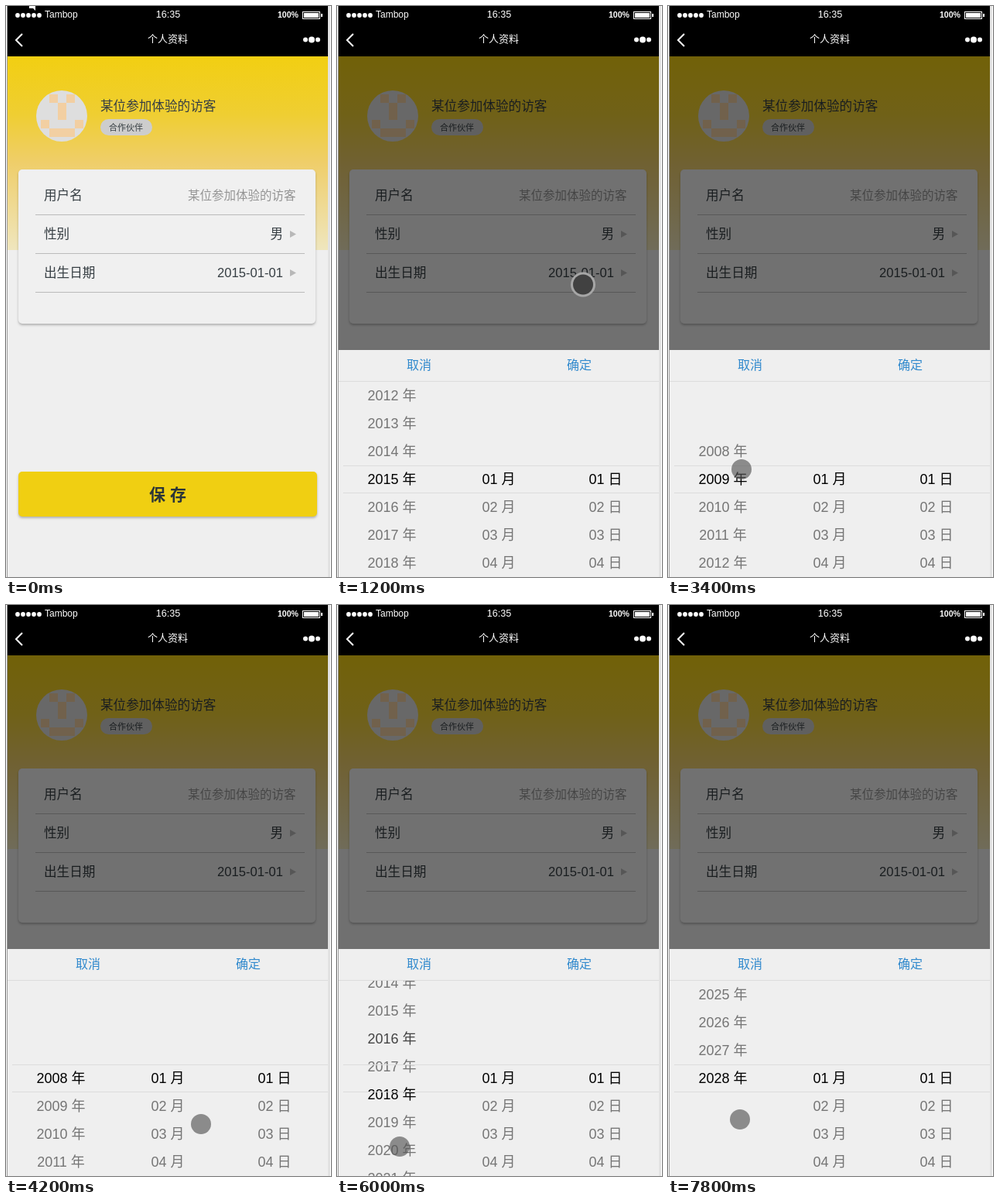
Write an HTML page with a canvas that moves like this. It is 420 px wide and 737 px high and loops after 8 s.

```html
<!DOCTYPE html>
<html lang="zh">
<head>
<meta charset="utf-8">
<style>
html, body { margin: 0; width: 100%; height: 100%; overflow: hidden; background: #fff; }
canvas { display: block; }
</style>
</head>
<body>
<canvas id="stage" width="420" height="737"></canvas>
<script>
const ctx = document.getElementById('stage').getContext('2d');
const LOOP = 8000, STEP = 200, ROW = 36, CENTER = 611;
const OPEN_AT = 1200, FIRST_YEAR = 2008, LAST_YEAR = 2028;
const USER = '某位参加体验的访客';
const FONT = '"Liberation Sans", "Noto Sans CJK SC", "Noto Sans CJK", sans-serif';
const INK = '#363e43', DIM_INK = '#757575', LINE = '#dcdcdc';

// Each flick turns the year wheel by a number of rows.
const flicks = [
  { start: 2000, end: 3000, rows: -6 },
  { start: 3400, end: 4000, rows: -1 },
  { start: 5000, end: 6130, rows: 10 },
  { start: 6160, end: 7760, rows: 10 },
];

// Resting places of the finger: [time, x, y]
const finger = [[200, 150, 300], [400, 342, 617], [800, 318, 359.5], [1200, 318, 359.5],
  [2000, 85, 540], [3400, 95, 598], [4200, 252, 670], [4800, 81, 703],
  [6000, 81, 699], [7000, 87, 688], [7800, 93, 664]];

const clamp = x => Math.min(1, Math.max(0, x));
const ease = x => 0.27 * x + 0.73 * x * x * (3 - 2 * x);

function yearAt(t) {
  return flicks.reduce((year, f) =>
    year + f.rows * ease(clamp((t - f.start) / (f.end - f.start))), 2015);
}

function fingerAt(t) {
  const i = finger.findIndex(p => p[0] >= t);
  const [t1, x1, y1] = finger[i], [t0, x0, y0] = finger[Math.max(0, i - 1)];
  const f = t1 > t0 ? (t - t0) / (t1 - t0) : 1;
  return [x0 + (x1 - x0) * f, y0 + (y1 - y0) * f];
}

function rect(x, y, w, h, color) {
  ctx.fillStyle = color;
  ctx.fillRect(x, y, w, h);
}

function disc(x, y, r, color) {
  ctx.fillStyle = color;
  ctx.beginPath();
  ctx.arc(x, y, r, 0, Math.PI * 2);
  ctx.fill();
}

function panel(x, y, w, h, r, color, shadow) {
  ctx.save();
  if (shadow) {
    ctx.shadowColor = 'rgba(0,0,0,.25)';
    ctx.shadowBlur = 3;
    ctx.shadowOffsetY = 2;
  }
  ctx.fillStyle = color;
  ctx.beginPath();
  ctx.roundRect(x, y, w, h, r);
  ctx.fill();
  ctx.restore();
}

function poly(points, color) {
  ctx.fillStyle = color;
  ctx.beginPath();
  points.forEach(p => ctx.lineTo(...p));
  ctx.fill();
}

// y is the middle of the line
function text(str, x, y, size, color, align = 'left', weight = 400) {
  ctx.font = `${weight} ${size}px ${FONT}`;
  ctx.textAlign = align;
  ctx.fillStyle = color;
  ctx.fillText(str, x, y + size * 0.36);
}

function header() {
  rect(2, 0, 414, 65, '#000');
  for (let i = 0; i < 5; i++) disc(15 + i * 7, 12, 2.9, '#fff');
  text('Tambop', 50, 11, 12, '#fff');
  text('16:35', 209.5, 10.5, 12.6, '#fff', 'center');
  text('100%', 378, 11.5, 10.6, '#fff', 'right', 700);
  ctx.strokeStyle = '#fff';
  ctx.lineWidth = 1;
  ctx.strokeRect(383.5, 7.5, 22, 9);
  rect(385, 9, 19, 6, '#fff');
  rect(407, 10, 2, 4, '#fff');
  ctx.lineWidth = 2;
  ctx.beginPath();
  ctx.moveTo(21, 36);
  ctx.lineTo(13, 44);
  ctx.lineTo(21, 52);
  ctx.stroke();
  text('个人资料', 209, 42, 13, '#fff', 'center', 500);
  for (const side of [-1, 0, 1]) disc(395 + side * 8, 43.5, side ? 3 : 4, '#fff');
}

function avatar() {
  ctx.save();
  disc(72, 142, 33, '#dedede');
  ctx.clip();
  ['.#.#.', '..#..', '..#..', '#...#', '.###.'].forEach((row, j) =>
    [...row].forEach((cell, i) => {
      if (cell === '#') rect(45 + i * 11, 114 + j * 11, 11, 11, '#f2cfa2');
    }));
  ctx.restore();
}

function profile() {
  const sky = ctx.createLinearGradient(0, 65, 0, 315);
  sky.addColorStop(0, '#f2cf12');
  sky.addColorStop(0.3, '#efce32');
  sky.addColorStop(0.55, '#efce6a');
  sky.addColorStop(1, '#efe6be');
  rect(2, 65, 414, 250, sky);

  avatar();
  text(USER, 122, 129, 16.6, INK, 'left', 300);
  panel(122, 146, 67, 21, 10.5, '#cdcdcd');
  text('合作伙伴', 155, 157, 11, INK, 'center');

  panel(16, 211, 384, 199, 5, '#f0f0f0', true);
  ['用户名', '性别', '出生日期'].forEach((label, i) => {
    const y = 244.5 + i * 50;
    text(label, 49, y, 16.6, INK, 'left', 300);
    rect(38, y + 24.5, 348, 1, '#bbb');
    if (i) poly([[367, y - 4.5], [375, y], [367, y + 4.5]], '#b8b8b8');
  });
  text(USER, 374.5, 244.5, 15.5, '#949494', 'right', 300);
  text('男', 358, 294.5, 16.6, INK, 'right', 300);
  text('2015-01-01', 358, 344.5, 16.6, INK, 'right');

  panel(16, 601, 386, 58, 5, '#f0cf12', true);
  text('保 存', 209, 630, 21, '#2b3538', 'center', 700);
}

function wheels(t) {
  const year = yearAt(t), active = Math.ceil(year);
  const fading = Math.ceil(yearAt(t - STEP));
  for (let y = FIRST_YEAR; y <= LAST_YEAR; y++) {
    const color = y === active ? '#000' : y === fading ? '#444' : DIM_INK;
    text(`${y} 年`, 71, CENTER + (y - year) * ROW, 18, color, 'center');
  }
  for (let i = 0; i < 4; i++) {
    const color = i ? DIM_INK : '#000', y = CENTER + i * ROW;
    text(`0${i + 1} 月`, 209, y, 18, color, 'center');
    text(`0${i + 1} 日`, 347, y, 18, color, 'center');
  }
}

function picker(t) {
  rect(2, 65, 414, 379, 'rgba(0,0,0,.53)');
  rect(2, 444, 414, 293, '#efefef');
  text('取消', 106, 463.5, 16, '#3089cd', 'center');
  text('确定', 313, 463.5, 16, '#3089cd', 'center');
  rect(2, 484, 414, 1, LINE);

  ctx.save();
  ctx.beginPath();
  ctx.rect(2, 485, 414, 252);
  ctx.clip();
  wheels(t);
  ctx.restore();
  rect(8, 593, 408, 1, LINE);
  rect(8, 628, 408, 1, LINE);
}

function pointer(t) {
  if (t < STEP) {
    poly([[30, 0], [38, 0], [38, 6], [35, 3], [30, 3]], '#fff');
    return;
  }
  const [x, y] = fingerAt(t);
  if (t === OPEN_AT) {
    disc(x, y, 16, '#a6a6a6');
    disc(x, y, 13, '#414141');
  } else {
    disc(x, y, 13, 'rgba(85,85,85,.65)');
  }
}

function draw(now) {
  const t = Math.floor(now % LOOP / STEP) * STEP;
  rect(0, 0, 420, 737, '#fff');
  rect(1, 0, 1, 737, '#999');
  rect(2, 0, 414, 737, '#efefef');
  rect(416, 0, 3, 737, '#e2e2e2');
  profile();
  if (t >= OPEN_AT) picker(t);
  header();
  pointer(t);
}

const start = performance.now();
function tick() {
  draw(performance.now() - start);
  requestAnimationFrame(tick);
}
tick();
</script>
</body>
</html>
```
